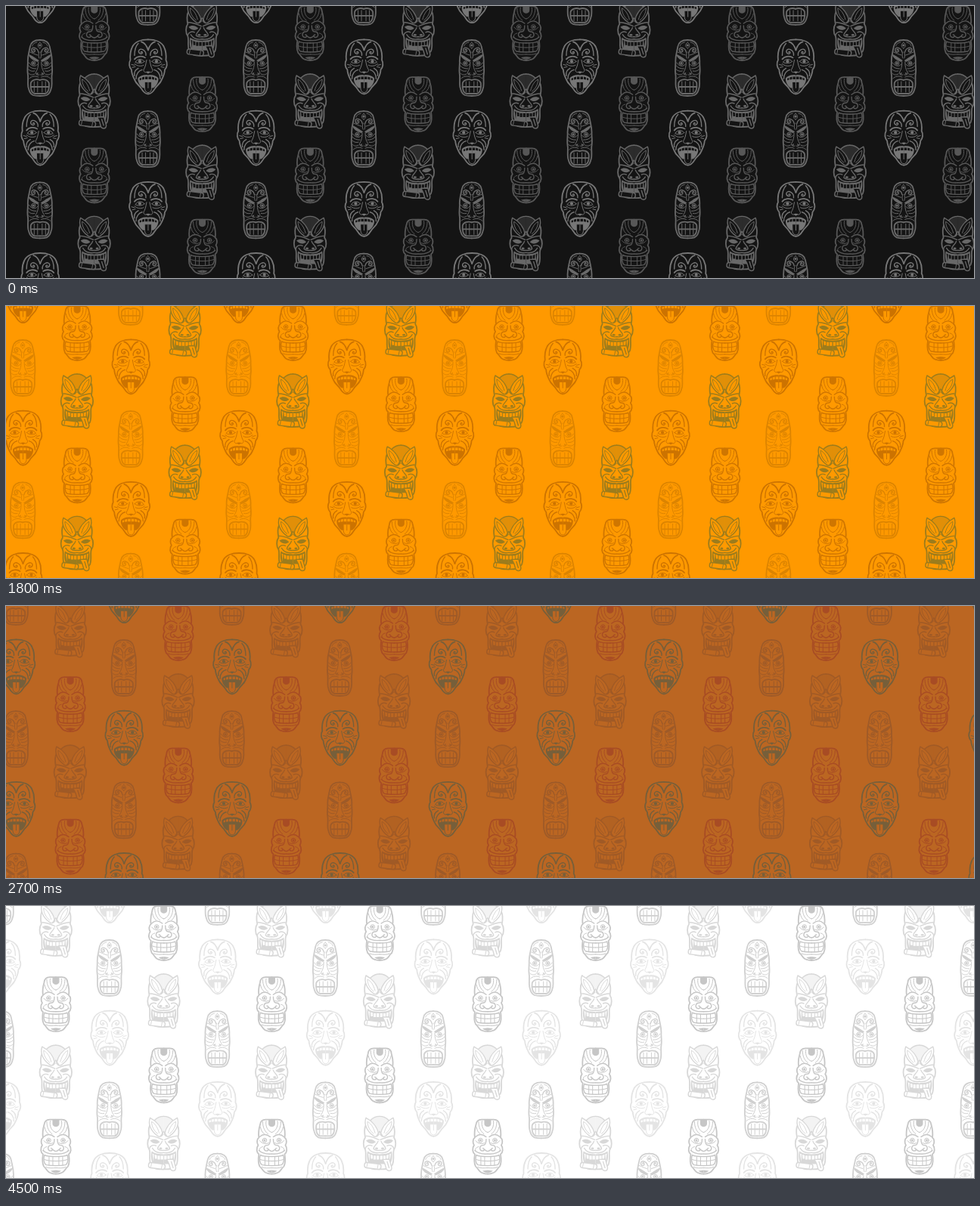
An HTML page that plays this animation: 1280 px wide and 360 px high, repeating every 5400 ms.

```html
<!DOCTYPE html>
<html lang="en">
<head>
<meta charset="utf-8">
<title>Carved mask pattern</title>
<style>
  html, body { margin: 0; width: 100%; height: 100%; overflow: hidden; }
  #stage {
    display: block; width: 1280px; height: 360px;
    background: var(--bg);
    animation: palette 5400ms step-end infinite;
  }
  #pattern { transform: translateX(var(--x)); }
  #stage g, #stage use { fill: none; stroke-linecap: round; stroke-linejoin: round; }
  .face { color: var(--face); }
  .tall { color: var(--tall); }
  .block { color: var(--block); }
  .wolf { color: var(--wolf); }
  path, circle, ellipse, rect { stroke: currentColor; stroke-width: 1; }
  .edge { stroke-width: 1.8; }
  .bold { stroke-width: 1.4; }
  .solid { fill: currentColor; stroke: none; }
  .cut { fill: var(--bg); stroke: none; }
  .over { fill: var(--bg); }

  @keyframes palette {
    0%, 100% { --x: 0px; --bg: #141414; --face: #777; --tall: #6a6a6a; --block: #575757; --wolf: #686868; }
    16.6666% { --x: 129.9px; --bg: #00272f; --face: #784b25; --tall: #503839; --block: #784920; --wolf: #4e4c2e; }
    33.3333% { --x: -22.7px; --bg: #ff9900; --face: #cc7300; --tall: #dc8400; --block: #cf7600; --wolf: #9c7c1c; }
    50% { --x: 111px; --bg: #bb6622; --face: #765f3a; --tall: #9e5a28; --block: #a84c24; --wolf: #a05a26; }
    66.6666% { --x: -41.7px; --bg: #de562c; --face: #b84e2c; --tall: #84503a; --block: #b6502e; --wolf: #b04e2e; }
    83.3333% { --x: 91.9px; --bg: #ffffff; --face: #e4e4e4; --tall: #d0d0d0; --block: #c6c6c6; --wolf: #d8d8d8; }
  }
</style>
</head>
<body>
<svg id="stage" viewBox="0 0 1280 360" aria-hidden="true">
  <defs>
    <!-- Each half is mirrored; centred and lopsided parts are added on top. -->
    <g id="tallHalf">
      <path class="edge" d="M0-37C8-37 12-34 13-28C14-22 16-17 16-9C15.5-5 17 2 16 8C15 13 16.5 18 15.5 25C14 31 13 34 9 36C6 37 3 37 0 37"/>
      <path class="bold" d="M2-21C3-27 11-29 11-24C11-20 6-20 6.5-23.5C7-25.5 9-25 8.5-23.5"/>
      <path d="M4-34C8-33 10-31 10-29M0-34C3.5-31 3.5-28 0-26"/>
      <path d="M3-17C7-18 10-20 13-21M1-21C2-18 2-16 1-13"/>
      <path class="solid" d="M1-10C5-12 10-17 15-18C14-13 9-10 3-8Z"/>
      <circle cx="8.5" cy="-6.5" r="2.6"/><circle class="solid" cx="8.5" cy="-6.5" r="1.5"/>
      <path d="M3-5C6-1 11-2 14.5-7M2-8C2-2 3 2 5 5C7 8 4 10 1 9M5 1C9 1 13 0 15-3M7 4C10 5 13 4 15 2M7 8C10 10 13 9 15 7M2 12C7 10 11 11 14 14"/>
      <path class="solid" d="M2 6L5 7L3 9Z"/>
      <path class="edge" d="M0 16C5 14 11 16 12 20C13 27 11 33 7 34H0M0 25H11"/>
      <path d="M3 18V32M7.5 18V32"/>
    </g>
    <g id="tall">
      <use href="#tallHalf"/><use href="#tallHalf" transform="scale(-1 1)"/>
      <circle class="solid" cy="-30" r="1.6"/>
    </g>

    <g id="faceHalf">
      <path class="edge" stroke-width="2.2" d="M0-36C9-36 18-33 21-26C24-20 24-14 23.5-9C26-5 25 1 22 4C22 9 20 13 18 17C16 23 11 25 9 29C6 34 3 36 0 36"/>
      <path class="edge" d="M0-22C2-28 5-32 9-33M4-12C8-15 15-14 18-10"/>
      <path class="bold" d="M3-15C2-22 11-26 12.5-21C13-17 8-16 7.5-18.5C7.5-20 9.5-20.5 9.5-19"/>
      <path class="bold" d="M13-31C17-27 18-22 18-15"/>
      <path d="M5-7C8-11 14-11 17-6C13-4 8-4 5-7ZM6-2C10 0 15-1 18-4M2-9C3-3 4 1 6 4C6 7 4 8 2 7"/>
      <circle class="solid" cx="11" cy="-7.2" r="2.1"/>
      <path class="bold" d="M8 4C12 5 16 9 16 16M13 2C17 4 19 7 18 12"/>
      <path class="solid" d="M0 11C6 10 11 12 13.5 15C14 20 11 25 7 28H0Z"/>
      <path class="cut" d="M.6 13H4V16.5H.6ZM5 13L8 14V17L5 16.5ZM9 14.5L11.5 15.5L11 18L9 17Z"/>
      <path d="M22-3L18-2M21 1L17 0"/>
    </g>
    <g id="face">
      <use href="#faceHalf"/><use href="#faceHalf" transform="scale(-1 1)"/>
      <path class="over" d="M-4.5 20H4.5V29C4 36 -4 36 -4.5 29ZM0 21V28"/>
      <path class="solid" d="M-3 7Q0 5 3 7L0 9Z"/>
    </g>

    <g id="blockHalf">
      <path class="edge" d="M0-36H8C13-36 15-34 15.5-29C17-24 18-18 17-12C20-10 20-5 18-2C21 2 20 8 17 10C18 16 18 22 16 26C12 29 12 34 6 35C4 36 2 36 0 36"/>
      <path d="M7.5-34C9-27 5-20 0-19M12-33C12-25 9-20 5-17M15-26C14-22 13-19 10-17"/>
      <path class="bold" d="M2-13C7-17 12-17 16-13"/>
      <circle cx="9.5" cy="-8.5" r="2.8"/><circle class="solid" cx="9.5" cy="-8.5" r="1.5"/>
      <path d="M4-5C8-3 13-4 16-8M12 0C16 1 17 3 16 6"/>
      <path class="bold" d="M2-10C2-5 3-2 6-2C11-2 12 5 7 5.5C4 5.5 4 2 6.5 2M0 6C2 6 3 5 4 4"/>
      <path class="bold" d="M0 9.5C7 10 13 9 17 5M0 13C7 13 12 13 15 11C17 16 16 22 13 24C8 25 4 25 0 25"/>
      <path d="M0 19C6 19 11 18.5 15 17M4 13V25M9 13V24.5"/>
      <path d="M0 28C5 28 9 29 13 27"/>
      <path class="solid" d="M0 31L7 32L4 34L0 35Z"/>
    </g>
    <g id="block">
      <use href="#blockHalf"/><use href="#blockHalf" transform="scale(-1 1)"/>
      <path class="solid" d="M-4.5-36V-30C-4-25 4-25 4.5-30V-36Z"/>
    </g>

    <g id="wolfHalf">
      <path class="solid" opacity=".3" d="M0-37C5-37 9-35 12-32L4-20L0-17Z"/>
      <path class="bold" d="M0-37C5-37 9-35 12-32"/>
      <path class="edge" d="M18-26C21-20 20-14 19-9C22-5 22 3 19 7C17 12 20 20 17 27C14 32 10 33 0 33"/>
      <path class="over bold" d="M1-13C3-23 10-31 18-35C21-27 17-18 9-12C6-9 3-10 1-13Z"/>
      <path d="M6-15C8-23 12-28 16-30C16-24 13-18 8-14"/>
      <path class="bold" d="M1-6C6-8 11-11 18-11M0-17L4-11"/>
      <path class="solid" d="M5-3C8-7 14-8 18-5C14 0 9 0 5-3Z"/>
      <path class="bold" d="M2-4C3 0 8 2 8 6C6 9 3 8 0 8M10 2C14 0 18 2 19 6M0 11C6 12 12 10 15 5"/>
      <ellipse class="solid" cx="4" cy="5.5" rx="2" ry="1.4"/>
      <path class="solid" d="M0 13C6 13 12 12 16 9C17 15 17 21 14 26H0Z"/>
      <path class="cut" d="M.7 15H4V20H.7ZM5 15H8V20H5ZM9 14.5L12 13.5L11.5 19H9ZM13 13L15 12L13.5 23Z"/>
    </g>
    <g id="wolf">
      <use href="#wolfHalf"/><use href="#wolfHalf" transform="scale(-1 1)"/>
      <path class="over bold" d="M4 20H13L16 31C16 36 11 36 9 33L7 26ZM10 23L12.5 31"/>
      <rect class="over bold" x="-20" y="25" width="22" height="7" rx="3" transform="rotate(7 -10 28)"/>
      <path d="M-16 25L-17 30M-2 27L-3 32"/>
    </g>

    <clipPath id="frame"><path d="M0 0H1280V360H0Z"/></clipPath>
  </defs>
  <g clip-path="url(#frame)"><g id="pattern"></g></g>
</svg>
<script>
  const STEP_X = 142.75, STEP_Y = 94.2;
  const masks = { tall: [44.8, 82], face: [45.2, 174.6], block: [116.8, 36], wolf: [116.6, 127] };
  const pattern = document.getElementById('pattern');

  function place(name, x, y) {
    const mask = document.createElementNS('http://www.w3.org/2000/svg', 'use');
    mask.setAttribute('href', '#' + name);
    mask.setAttribute('class', name);
    mask.setAttribute('x', x);
    mask.setAttribute('y', y);
    pattern.append(mask);
  }

  // Every mask repeats on a half-drop lattice.
  for (const [name, [x, y]] of Object.entries(masks)) {
    for (let col = -2; col < 10; col++) {
      for (let row = -2 + Math.abs(col % 2); row < 4; row += 2) {
        place(name, x + col * STEP_X, y + row * STEP_Y);
      }
    }
  }
</script>
</body>
</html>
```
